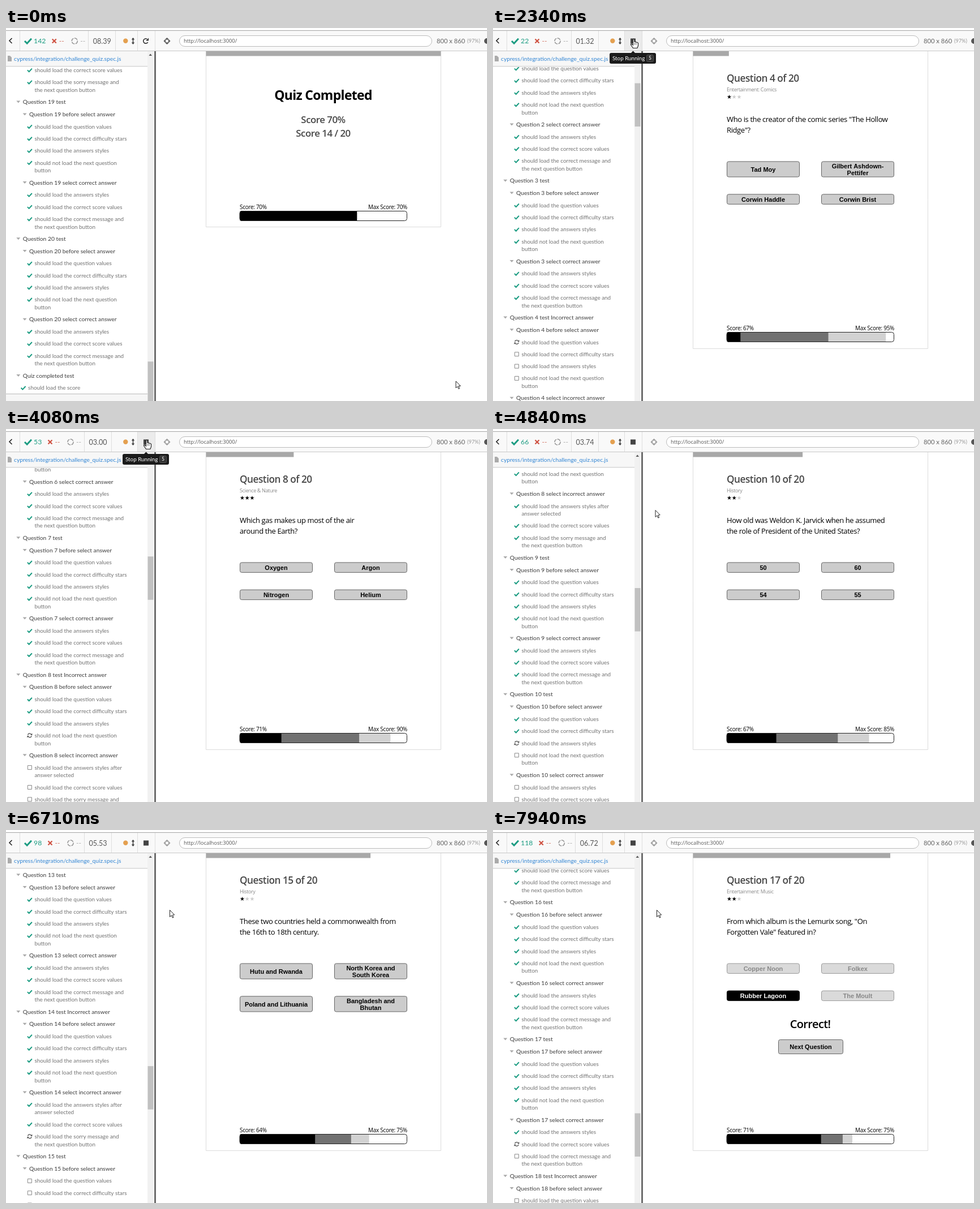
An HTML page with a canvas for the animation above (8000 ms loop, 850 by 659 pixels).

```html
<!DOCTYPE html>
<html lang="en">
<head>
<meta charset="utf-8">
<title>Quiz test run</title>
<style>
html, body { margin: 0; width: 100%; height: 100%; overflow: hidden; background: #fff; }
canvas { display: block; }
</style>
</head>
<body>
<canvas id="stage" width="850" height="659"></canvas>
<script>
const ctx = document.getElementById('stage').getContext('2d');
const LOOP = 8000, TICK = 69.1;
const RESTART = 10, START = 13, TOTAL = 142;
const SIDE = 'Lato, sans-serif', PAGE = '"Open Sans", sans-serif', BUTTON = '"Liberation Sans", Arial, sans-serif';
const MISSED = [1, 4, 8, 12, 14, 18];

// tick, runner clock in seconds, tests passed
const PROGRESS = [[13, 0, 0], [18, .32, 5.2], [34, 1.32, 22.1], [49, 2.32, 41.3],
  [70, 3.74, 66.3], [97, 5.53, 98.6], [115, 6.72, 118.3], [116, 6.79, 119.3]];

// category; stars; question; four answers; index of the right one ("|" breaks a line)
const QUESTIONS = `Entertainment: Video Games;3;What was the name of the hero in the 80s animated|video game 'Goblin's Keep'?;Edmund;Sir Oswin Pell;Bran the Valiant;Rolf of Harrowby;2
Science & Nature;1;What is the chemical symbol for iron?;Ir;Fe;In;Fr;1
Geography;2;Which ocean lies between Africa and Australia?;Indian;Pacific;Arctic;Atlantic;0
Entertainment: Comics;1;Who is the creator of the comic series "The Hollow|Ridge"?;Tad Moy;Gilbert Ashdown-|Pettifer;Corwin Haddle;Corwin Brist;2
General Knowledge;1;How many sides does a hexagon have?;Five;Six;Seven;Eight;1
Geography;1;What is the capital of Jamaica?;Rio de Janeiro;Dar es Salaam;Kano;Kingston;3
Science: Mathematics;2;What is the square root of 144?;12;14;16;18;0
Science & Nature;3;Which gas makes up most of the air|around the Earth?;Oxygen;Argon;Nitrogen;Helium;2
General Knowledge;1;How many minutes are there in two hours?;100;110;120;140;2
History;2;How old was Weldon K. Jarvick when he assumed|the role of President of the United States?;50;60;54;55;3
Science: Computers;1;How many bits are there in one byte?;4;8;16;32;1
Animals;2;What is a group of crows called?;Murder;Pride;School;Swarm;0
Geography;2;Which of these countries has no coastline?;Spain;Peru;Kenya;Bolivia;3
Science & Nature;2;Which planet is closest to the Sun?;Venus;Mercury;Mars;Earth;1
History;1;These two countries held a commonwealth from|the 16th to 18th century.;Hutu and Rwanda;North Korea and|South Korea;Poland and Lithuania;Bangladesh and|Bhutan;2
Animals;1;How many legs does a spider have?;Six;Eight;Ten;Twelve;1
Entertainment: Music;2;From which album is the Lemurix song, "On|Forgotten Vale" featured in?;Copper Noon;Folkex;Rubber Lagoon;The Moult;2`
  .split('\n').map(line => line.split(';'));

const lerp = (a, b, k) => a + (b - a) * k;
const clamp = (v, lo = 0, hi = 1) => Math.min(hi, Math.max(lo, v));
const smooth = k => k * k * (3 - 2 * k);

function text(str, x, y, size, color, { font = SIDE, weight = 400, align = 'left', tight = 0 } = {}) {
  ctx.font = `${weight} ${size}px ${font}`;
  ctx.letterSpacing = `${-tight * size}px`;
  ctx.textAlign = align;
  ctx.fillStyle = color;
  ctx.fillText(str, x, y + size * .36);
}
const pageText = (str, x, y, size, color, options) =>
  text(str, x, y, size, color, { font: PAGE, tight: .03, ...options });

function rect(x, y, w, h, fill) {
  ctx.fillStyle = fill;
  ctx.fillRect(x, y, w, h);
}
function rounded(x, y, w, h, r, fill, stroke) {
  ctx.beginPath();
  ctx.roundRect(x, y, w, h, r);
  paint(fill, stroke);
}
function paint(fill, stroke, width = 1) {
  if (fill) { ctx.fillStyle = fill; ctx.fill(); }
  if (stroke) { ctx.strokeStyle = stroke; ctx.lineWidth = width; ctx.stroke(); }
}
function path(points, fill, stroke, width, close = !!fill) {
  ctx.beginPath();
  points.forEach(([x, y]) => ctx.lineTo(x, y));
  if (close) ctx.closePath();
  paint(fill, stroke, width);
}
function arc(x, y, r, from, to, fill, stroke, width) {
  ctx.beginPath();
  ctx.arc(x, y, r, from, to);
  paint(fill, stroke, width);
}
const check = (x, y, s, color) =>
  path([[x - s, y], [x - s * .3, y + s * .7], [x + s, y - s * .7]], null, color, s * .5);

// Test list
const rows = [];
let listY = 77, testCount = 0;
function addRow(label, depth, isTest = false) {
  const lines = label.split('|');
  rows.push({ lines, y: listY, x: 18.5 + 11.3 * depth + (isTest ? -2 : 0), test: isTest ? testCount++ : -1 });
  listY += (isTest ? 21.3 : 21.8) + (lines.length - 1) * 13.6;
}
const addTests = (depth, ...labels) => labels.forEach(label => addRow('should ' + label, depth, true));
addRow('Challenge quiz e2e tests', 0);
addRow('Question 1 load the correct score values', 1);
addTests(2, 'load the correct score values');
for (let n = 1; n <= 20; n++) {
  const miss = MISSED.includes(n);
  addRow(`Question ${n} test${miss ? ' Incorrect answer' : ''}`, 1);
  addRow(`Question ${n} before select answer`, 2);
  addTests(3, 'load the question values', 'load the correct difficulty stars',
    'load the answers styles', 'not load the next question|button');
  addRow(`Question ${n} select ${miss ? 'in' : ''}correct answer`, 2);
  addTests(3, miss ? 'load the answers styles after|answer selected' : 'load the answers styles',
    'load the correct score values', `load the ${miss ? 'sorry' : 'correct'} message and|the next question button`);
}
const maxScroll = listY - 614;
addRow('Quiz completed test', 1);
addTests(2, 'load the score');

function runningIcon(x, y) {
  arc(x, y, 3.4, -2.9, -.5, null, '#555', 1.3);
  arc(x, y, 3.4, .25, 2.65, null, '#555', 1.3);
  path([[x + 4.5, y - 4], [x + 4.5, y - .5], [x + 1.2, y - .5]], '#555');
  path([[x - 4.5, y + 4], [x - 4.5, y + .5], [x - 1.2, y + .5]], '#555');
}

function drawSidebar({ loading, done, passed }) {
  const running = rows.find(row => row.test === passed);
  const scroll = loading ? 0 : running
    ? clamp(running.y + (running.lines.length - 1) * 13.6 - 555, 0, maxScroll) : maxScroll;
  ctx.save();
  ctx.beginPath();
  ctx.rect(0, 68, 250, 591);
  ctx.clip();
  if (loading) text('Your tests are loading...', 125, 110, 11, '#777', { align: 'center' });
  else for (const { lines, x, y: top, test } of rows) {
    const y = top - scroll;
    if (y < 40 || y > 680) continue;
    if (test < 0) path([[x - 11.5, y - 2], [x - 4.5, y - 2], [x - 8, y + 2]], '#aaa');
    else if (test < passed) check(x - 8.5, y, 4, '#1c9c82');
    else if (test === passed) runningIcon(x - 8.5, y);
    else { ctx.beginPath(); ctx.rect(x - 12, y - 3.5, 7, 7); paint(null, '#888'); }
    lines.forEach((line, i) => text(line, x, y + i * 13.6, test < 0 ? 10.25 : 9.9, test < 0 ? '#3c3c3c' : '#727272'));
  }
  if (done) {
    rect(0, 646, 250, 13, '#f6f6f6');
    rect(0, 646, 250, 1, '#bbb');
  }
  ctx.restore();

  rect(250, 41, 11, 618, '#f1f1f1');
  if (!loading) rect(250.5, 53 + scroll * .1207, 10, 76.5, '#c1c1c1');
  path([[252.5, 49], [258, 49], [255.2, 45.5]], '#555');
  rect(0, 41, 250, 26, '#f7f7f7');
  rect(0, 67, 250, 1, '#d5d5d5');
  rect(0, 68, 250, 1, '#eee');
  path([[3, 49], [7, 49], [10, 52], [10, 59], [3, 59]], '#aaa');
  text('cypress/integration/challenge_quiz.spec.js', 14, 54, 10.25, '#3386d4');
  rect(262, 41, 3, 618, '#6d6d6d');
}

function reloadIcon(x, y) {
  arc(x, y, 4.2, .5, 5.2, null, '#333', 1.6);
  path([[x + 5, y - 5.5], [x + 5, y - .5], [x, y - .5]], '#333');
}

function drawToolbar({ loading, done, passed, clock, hover }) {
  rect(0, 5, 850, 36, '#f9f9f9');
  rect(0, 4, 850, 1, '#a5a5a5');
  rect(0, 40, 850, 1, '#c8c8c8');
  if (hover) rect(233, 5, 30, 35, '#ebebeb');
  const count = loading || passed === 0 ? '--' : String(passed);
  const dx = 7.25 * count.length;
  path([[10.5, 18], [6, 22.5], [10.5, 27]], null, '#222', 1.6);
  for (const x of [24, 123.5 + dx, 171.5 + dx, 232, 263]) rect(Math.round(x), 5, 1, 35, '#dedede');
  check(39, 23, 6, '#1c9c82');
  text(count, 49, 23, 12.3, '#1c9c82');
  const cx = 63.5 + dx;
  path([[cx - 3.5, 19.5], [cx + 3.5, 26.5]], null, '#cf5242', 2.2);
  path([[cx + 3.5, 19.5], [cx - 3.5, 26.5]], null, '#cf5242', 2.2);
  text('--', 72 + dx, 23, 12, '#d0705f');
  ctx.setLineDash([6, 1.5]);
  arc(99.5 + dx, 23, 5, 0, 7, null, '#999', 1.6);
  ctx.setLineDash([]);
  text('--', 109.5 + dx, 23, 12, '#aaa');
  text(loading ? '--' : clock.toFixed(2).padStart(5, '0'), 132 + dx, 23, 12.5, '#555');
  arc(211.3, 22.8, 4.2, 0, 7, '#e4a050');
  path([[224.5, 19], [224.5, 27]], null, '#333', 1.4);
  path([[221.8, 20.5], [227.2, 20.5], [224.5, 17]], '#333');
  path([[221.8, 25.5], [227.2, 25.5], [224.5, 29]], '#333');
  if (done) reloadIcon(247, 23);
  else rect(243, 18.5, 9, 9, '#444');

  const ink = done ? '#333' : '#888';
  arc(284.5, 23, 3.8, 0, 7, null, ink, 1.3);
  for (const [x, y] of [[1, 0], [-1, 0], [0, 1], [0, -1]])
    path([[284.5 + x * 2, 23 + y * 2], [284.5 + x * 5.8, 23 + y * 5.8]], null, ink, 1.3);
  rounded(306.5, 13.5, 446, 19, 9.5, '#fff', '#bbb');
  text('http://localhost:3000/', 314, 23, 9.4, '#555', { font: PAGE });
  text('800 x 860', 761, 23, 11.2, '#666');
  text('(97%)', 815, 23, 9.2, '#999');
  arc(850, 23, 5, 0, 7, '#555');
}

// Quiz page
function scores(answered) {
  const missed = MISSED.filter(n => n <= answered).length;
  const right = answered - missed;
  return [1 - missed / 20, answered > 0 ? right / answered : 0, right / 20];
}

function drawScore(y, answered, ease) {
  const from = scores(answered - 1), to = scores(answered);
  const percent = v => Math.round(v * 100) + '%';
  pageText('Score: ' + percent(to[1]), 413, y - 6.5, 10, '#000');
  pageText('Max Score: ' + percent(to[0]), 709, y - 6.5, 10, '#000', { align: 'right' });
  ctx.save();
  ctx.beginPath();
  ctx.roundRect(413, y, 296, 18, 4);
  ctx.clip();
  ['#d2d2d2', '#717171', '#000'].forEach((color, i) =>
    rect(413, y, 296 * (answered ? lerp(from[i], to[i], ease) : to[i]), 18, color));
  ctx.restore();
  rounded(413, y + .5, 295.5, 17, 4, null, '#222');
}

function drawButton(label, x, y, w, h, fill, ink, border) {
  rounded(x + .5, y + .5, w - 1, h - 1, 3, fill, border);
  const lines = label.split('|');
  lines.forEach((line, i) => text(line, x + w / 2, y + h / 2 + .3 + (i - (lines.length - 1) / 2) * 12, 11, ink,
    { font: BUTTON, weight: 700, align: 'center' }));
}

function drawAnswers(answers, correct, answered, missed) {
  let y = 235.4;
  for (const first of [0, 2]) {
    const h = answers.slice(first, first + 2).some(label => label.includes('|')) ? 28.2 : 18.5;
    for (const i of [first, first + 1]) {
      const chosen = missed && i === (correct + 1) % 4;
      const look = !answered ? ['#ccc', '#000', '#666']
        : i === correct ? ['#000', '#fff', '#000']
        : chosen ? ['#fff', '#000', '#666'] : ['#dadada', '#888', '#999'];
      drawButton(answers[i], i % 2 ? 580 : 413, y, 129, h, ...look);
    }
    y += h + 29.7;
  }
}

function drawPage({ loading, done, work }) {
  if (loading) return;
  const height = done ? 311 : 526;
  ctx.beginPath();
  ctx.rect(353.5, 40.5, 415, height);
  paint('#fff', '#dcdcdc');
  if (done) {
    rect(353.5, 41, 415, 8.5, '#aaa');
    pageText('Quiz Completed', 560.5, 119, 23, '#000', { weight: 700, align: 'center' });
    pageText('Score 70%', 560.5, 162, 16.9, '#484848', { weight: 600, align: 'center' });
    pageText('Score 14 / 20', 560.5, 185.5, 16.9, '#484848', { weight: 600, align: 'center' });
    drawScore(323, 20, 1);
    return;
  }
  // The page moves on half a test before the runner reports it
  const steps = Math.max(0, work - 1);
  const number = Math.min(QUESTIONS.length, Math.floor((steps + .5) / 7) + 1);
  const step = steps - (number - 1) * 7;
  const answered = step >= 4.3;
  const lastAnswer = answered ? number : number - 1;
  const [category, stars, question, ...rest] = QUESTIONS[number - 1];
  const advance = number === 1 ? 1 : clamp((step + .5) / 7) ** 1.2;
  const wait = clamp((steps - (lastAnswer - 1) * 7 - 4.3) / 7);

  rect(353.5, 41, 415 * (number - 1 + advance) / 20, 8.5, '#a8a8a8');
  pageText(`Question ${number} of 20`, 413, 88.5, 17.3, '#484848', { weight: 600 });
  pageText(category, 413, 108.5, 9, '#888', { tight: .04 });
  for (let i = 0; i < 3; i++)
    text('★', 413 + i * 8.7, 121, 10, i < stars ? '#000' : '#ccc', { font: '"DejaVu Sans", sans-serif' });
  question.split('|').forEach((line, i) => pageText(line, 413, 161.5 + i * 18.5, 13, '#000'));

  const missed = MISSED.includes(number);
  drawAnswers(rest.slice(0, 4), +rest[4], answered, missed);
  if (answered) {
    pageText(missed ? 'Sorry!' : 'Correct!', 560.5, 343, 20, '#000', { weight: 600, align: 'center' });
    drawButton('Next Question', 504, 370, 115, 26, '#ccc', '#000', '#666');
  }
  drawScore(537, lastAnswer, 1 - (1 - wait) ** 2);
}

// Pointer and tooltip
function drawArrow(x, y) {
  path([[0, 0], [0, 12], [2.8, 9.4], [4.8, 13.6], [6.6, 12.8], [4.7, 8.7], [8.2, 8.4]]
    .map(([px, py]) => [x + px, y + py]), '#fff', '#222', 1);
}
function drawHand(x, y) {
  path([[0, 0], [2.2, 0], [2.6, 5], [5, 5.4], [7.5, 6], [9, 7], [9, 12], [7.4, 16], [0, 16], [-4, 10], [-3.4, 8.6], [0, 10.6]]
    .map(([px, py]) => [x + px, y + py]), '#fff', '#222', 1.2);
  for (const i of [3, 5.5]) path([[x + i, y + 7], [x + i, y + 10]], null, '#222', .8);
}
function drawTooltip(label, key) {
  path([[243, 45], [247.5, 40.5], [252, 45]], '#1b1b1b');
  rounded(206, 44, 82, 19, 3, '#1b1b1b');
  text(label, 211, 53, 9.8, '#fff');
  rounded(271.5, 47.5, 12, 12, 2, '#333', '#555');
  text(key, 277.5, 53, 8.5, '#fff', { align: 'center' });
}
function drawPointer(tick, done, hover) {
  if (hover) {
    drawTooltip(done ? 'Run All Tests' : 'Stop Running', done ? 'R' : 'S');
    drawHand(247.5, 19.5);
  } else if (tick < 7) {
    const k = smooth(tick / 7);
    drawArrow(lerp(795, 248, k), lerp(624, 20, k));
  } else {
    const k = smooth(clamp((tick - 62) / 4));
    drawArrow(lerp(250, tick < 75 ? 287 : 289.5, k), lerp(45, tick < 75 ? 143.5 : 141.5, k));
  }
}

function progressAt(tick) {
  if (tick < RESTART) return [8.39, TOTAL];
  if (tick < START) return [0, 0];
  const next = Math.max(1, PROGRESS.findIndex(([t]) => t >= tick));
  const [a, b] = [PROGRESS[next - 1], PROGRESS[next]];
  const k = (tick - a[0]) / (b[0] - a[0]);
  return [lerp(a[1], b[1], k), lerp(a[2], b[2], k)];
}

function frame(now) {
  const tick = Math.min(115, Math.floor((now % LOOP + 22) / TICK));
  const [clock, work] = progressAt(tick);
  const done = tick < RESTART;
  const hover = tick >= 7 && tick < 62;
  const state = { clock, work, done, hover, passed: Math.floor(work + 1e-6), loading: !done && tick < START };
  rect(0, 0, 850, 659, '#fff');
  drawPage(state);
  drawSidebar(state);
  drawToolbar(state);
  drawPointer(tick, done, hover);
  requestAnimationFrame(frame);
}
requestAnimationFrame(frame);
</script>
</body>
</html>
```
